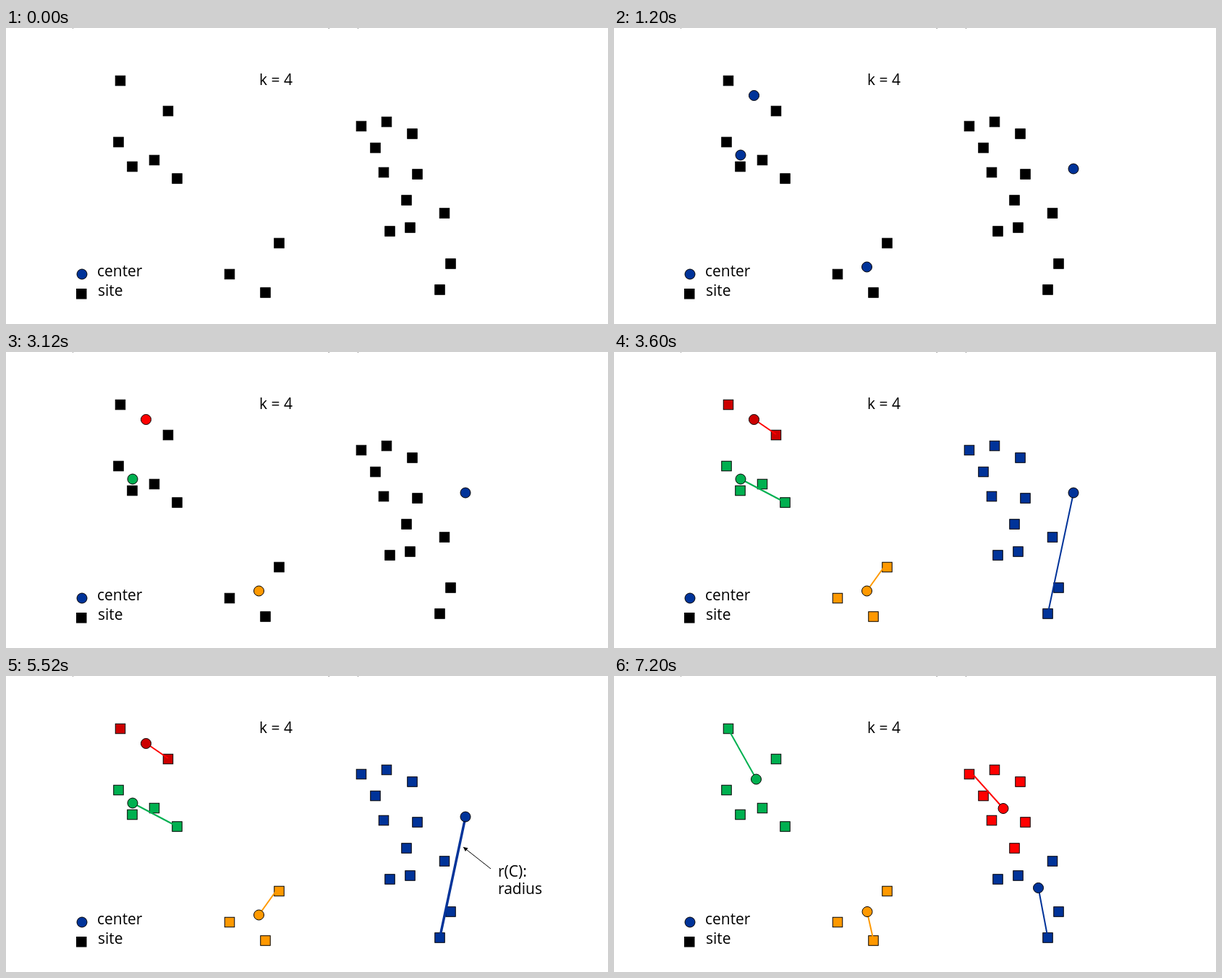
Write an HTML page that moves like this. It is 832 px wide and 410 px high and loops after 8 s.

```html
<!DOCTYPE html>
<html lang="en">
<head>
<meta charset="utf-8">
<title>k-center clustering</title>
<style>
html, body { margin: 0; width: 100%; height: 100%; overflow: hidden; background: #fff; }
svg { display: block; width: 100vw; height: 100vh; }
text { font: 21px "Open Sans", "Noto Sans", sans-serif; fill: #000; }
.dot { stroke: #000; stroke-width: 1; }
</style>
</head>
<body>
<svg viewBox="0 0 832 410">
  <path d="M91 -1l1.5 1.5M444.500 -1l2 1.500M488 -1l-2 1.500" stroke="#333" stroke-width="1" fill="none"/>
  <text x="350" y="78.500">k = 4</text>
  <text x="126" y="344">center</text>
  <text x="127" y="370.500">site</text>
  <circle class="dot" cx="105" cy="341" r="7" fill="#003399"/>
  <rect class="dot" x="97.500" y="361.500" width="13.500" height="13.500"/>
  <g id="scene"></g>
</svg>
<script>
const LOOP = 8000, STEP = 1200;
const BLUE = '#003399', GREEN = '#00b050', ORANGE = '#ff9900',
      RED = '#ff0000', DARK = '#cc0000', BLACK = '#000000';
const scene = document.getElementById('scene');

const sites = [
  [158, 73], [224, 115], [155.500, 158], [174.500, 192], [205, 183], [236.500, 208.500],
  [377.500, 298], [309, 341], [358.500, 366.500],
  [491, 136], [526, 130], [561.500, 146.500], [510.500, 166], [522, 200], [568.500, 202.500], [553.500, 238.500],
  [606, 256.500], [558.500, 276.500], [530.500, 281.500], [614.500, 326.500], [599.500, 362.500]
];

const run = (...parts) => parts.flatMap(([color, n]) => Array(n).fill(color));
const plain = run([BLACK, 21]);
const first = run([DARK, 2], [GREEN, 4], [ORANGE, 3], [BLUE, 12]);
const second = run([GREEN, 6], [ORANGE, 3], [RED, 7], [BLUE, 5]);

// centers: x, y, color; lines: x1, y1, x2, y2, color, width
const start = (a, b, c, d) => [
  [193.500, 93.500, a], [175, 176, b], [349.500, 331, c], [635, 195, d]
];
const redLine = [197, 95.500, 224, 114, RED, 2];
const greenLine = [179, 178, 232, 206, GREEN, 2];
const orangeLine = [353, 326, 373, 298, ORANGE, 2];
const blueLine = width => [634, 200, 600.500, 358, BLUE, width];
const assigned = start(DARK, GREEN, ORANGE, BLUE);

const stages = [
  { fill: plain, centers: [], lines: [] },
  { fill: plain, centers: start(BLUE, BLUE, BLUE, BLUE), lines: [] },
  { fill: plain, centers: start(RED, GREEN, ORANGE, BLUE), lines: [] },
  { fill: first, centers: assigned, lines: [redLine, greenLine, orangeLine, blueLine(2)] },
  { fill: first, centers: assigned, lines: [redLine, greenLine, orangeLine, blueLine(3.5)],
    arrow: [670, 267, 632, 237] },
  { fill: first,
    centers: [assigned[0], [191.500, 184.500, GREEN], assigned[2], [558.500, 223, BLUE]],
    lines: [redLine, [197, 188, 232, 207, GREEN, 2], orangeLine, [560, 228, 596.500, 358, BLUE, 3.5]],
    arrow: [670, 268, 593, 293.500] },
  { fill: second,
    centers: [[538, 183.500, RED], [196.500, 143, GREEN], [350, 326.500, ORANGE], [586.500, 293.500, BLUE]],
    lines: [[497, 137.500, 535, 180, RED, 2], [161, 79, 194, 138, GREEN, 2],
            [351, 332, 357.500, 361, ORANGE, 2], [587.500, 299, 598.500, 357, BLUE, 2]] }
];

const line = ([x1, y1, x2, y2, color, width]) =>
  `<line x1="${x1}" y1="${y1}" x2="${x2}" y2="${y2}" stroke="${color}" stroke-width="${width}"/>`;
const site = ([x, y], color) =>
  `<rect class="dot" x="${x - 6.75}" y="${y - 6.75}" width="13.5" height="13.5" fill="${color}"/>`;
const center = ([x, y, color]) =>
  `<circle class="dot" cx="${x}" cy="${y}" r="7" fill="${color}"/>`;

function label([x1, y1, x2, y2]) {
  const angle = Math.atan2(y2 - y1, x2 - x1) * 180 / Math.PI;
  return line([x1, y1, x2, y2, BLACK, 1]) +
    `<path d="M0 0L-6 -3V3Z" transform="translate(${x2} ${y2}) rotate(${angle})"/>` +
    '<text x="680" y="278">r(C):</text><text x="680" y="301.5">radius</text>';
}

let shown = -1;
function draw(time) {
  const index = Math.floor((time % LOOP) / STEP);
  if (index === shown) return;
  shown = index;
  const { fill, centers, lines, arrow } = stages[index];
  scene.innerHTML = sites.map((p, i) => site(p, fill[i])).join('') +
    lines.map(line).join('') + centers.map(center).join('') + (arrow ? label(arrow) : '');
}

const begin = performance.now();
function tick() {
  draw(performance.now() - begin);
  requestAnimationFrame(tick);
}
tick();
</script>
</body>
</html>
```
